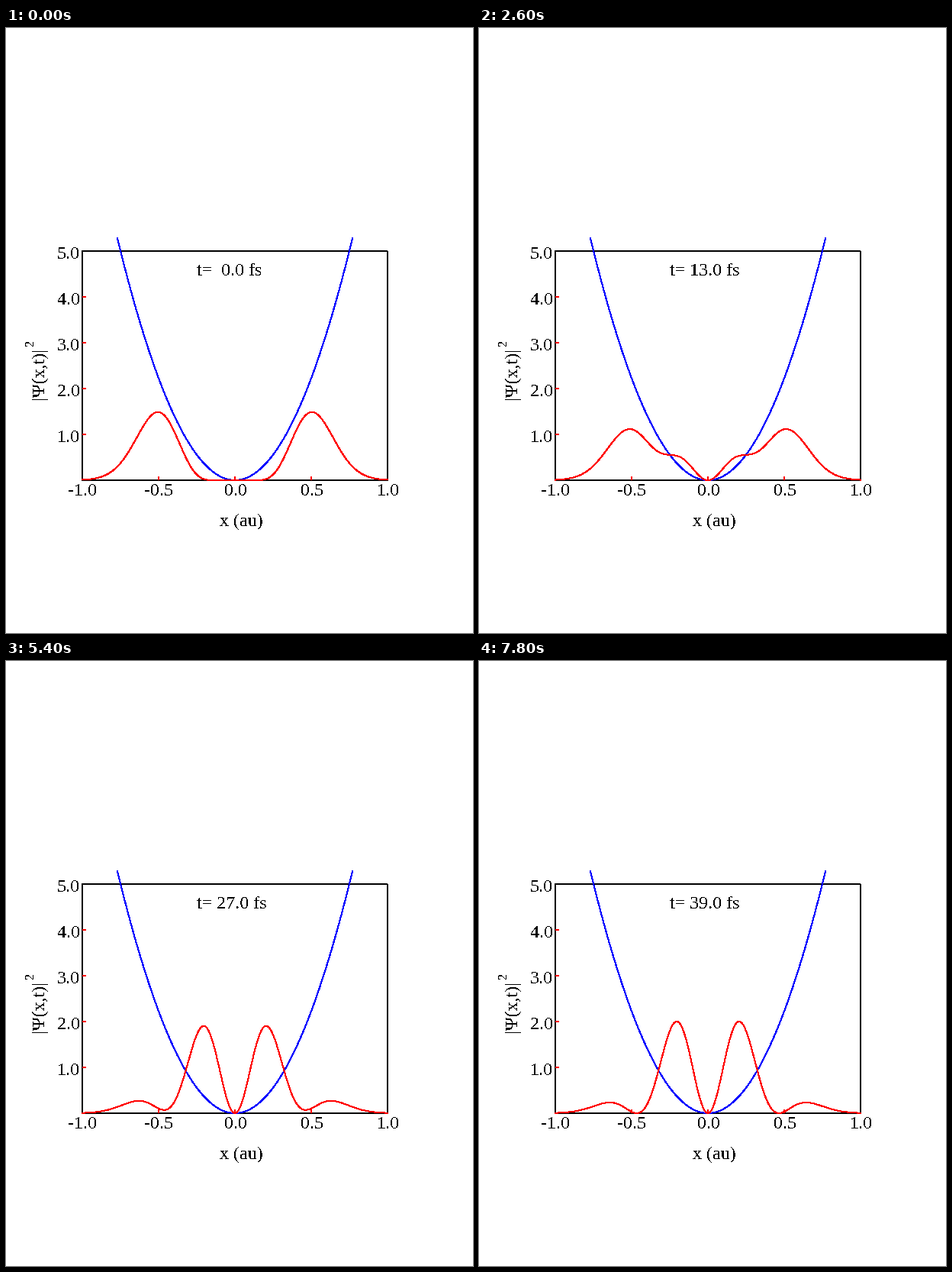
These frames come from a looping animation (612 by 792 pixels, 8 s). A matplotlib script:

```python
import numpy as np
import matplotlib.pyplot as plt
from matplotlib.animation import FuncAnimation

plt.rcParams["font.family"] = "Liberation Serif"
plt.rcParams["text.antialiased"] = False

WIDTH, HEIGHT = 612, 792
LEFT, BOTTOM = 100, 200          # plot box corner, in points
X_UNIT, Y_UNIT = 200, 60         # points per axis unit
FRAMES, INTERVAL = 40, 200       # one femtosecond per frame
RED, BLUE, BLACK = "#ff0000", "#0000ff", "#000000"

# Harmonic oscillator for a proton, in atomic units
MASS = 1836.15
OMEGA = 1500 / 219474.63
FS = 41.3414
ALPHA = MASS * OMEGA

fig = plt.figure(figsize=(WIDTH / 72, HEIGHT / 72), dpi=72, facecolor="white")
ax = fig.add_axes([0, 0, 1, 1])
ax.set_xlim(0, WIDTH)
ax.set_ylim(0, HEIGHT)
ax.axis("off")


def px(x):
    return LEFT + (x + 1) * X_UNIT


def py(y):
    return BOTTOM + y * Y_UNIT


def line(x, y, color, z, lw=2, cap="butt", join="miter"):
    return ax.plot(x, y, color=color, lw=lw, antialiased=False, zorder=z,
                   solid_capstyle=cap, solid_joinstyle=join)[0]


def curve(x, y, color, z):
    # Unsmoothed strokes fill every touched pixel, so 1 pt shows as 2 px
    return line(px(x), py(y), color, z, lw=1, cap="projecting", join="round")


def label(x, y, text, size=24, angle=0):
    return ax.text(x, y, text, fontsize=size, rotation=angle, color=BLACK,
                   ha="left", va="baseline", rotation_mode="anchor", zorder=6)


def density(x, t):
    """Equal mix of the first and third excited states at time t (fs)."""
    y = np.sqrt(ALPHA) * x
    envelope = (ALPHA / np.pi) ** 0.25 * np.exp(-y * y / 2)
    phi1 = envelope * np.sqrt(2) * y
    phi3 = envelope * (2 * y**3 - 3 * y) / np.sqrt(3)
    beat = 2 * OMEGA * t * FS
    return (phi1**2 + phi3**2) / 2 + phi1 * phi3 * np.cos(beat)


# Box, ticks and labels
line(px(np.array([1, -1, -1, 1, 1])), py(np.array([5, 5, 0, 0, 5])), BLACK, 1)
for v in range(1, 6):
    if v < 5:
        line([LEFT, LEFT + 5], [py(v)] * 2, RED, 2)
    label(67, py(v) - 10, f"{v:.1f}")
for v in (-1, -0.5, 0, 0.5, 1):
    if abs(v) < 1:
        line([px(v)] * 2, [BOTTOM, BOTTOM + 5], RED, 4)
    label(px(v) - (19 if v < 0 else 14), BOTTOM - 20, f"{v:.1f}")

label(280, 140, "x (au)")
label(49, 306, "|Ψ(x,t)|", angle=90)
label(36, 376, "2", size=16, angle=90)

# Potential
xv = np.linspace(-0.77, 0.77, 155)
curve(xv, 8.9 * xv**2, BLUE, 3)

# Moving parts
xs = np.linspace(-1, 1, 401)
wave = curve(xs, density(xs, 0), RED, 5)
clock = label(250, 468, "")


def update(i):
    wave.set_ydata(py(density(xs, i)))
    clock.set_text(f"t= {i:4.1f} fs")
    return wave, clock


anim = FuncAnimation(fig, update, frames=FRAMES, interval=INTERVAL,
                     init_func=lambda: update(0), repeat=True, repeat_delay=0)
plt.show()
```
